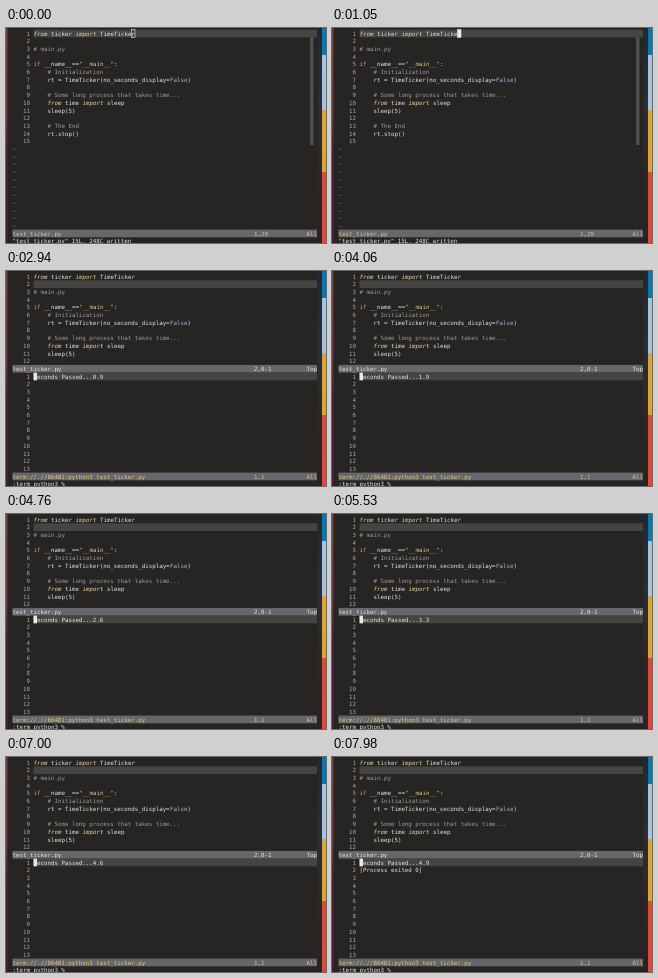
An HTML page that plays this animation: 320x215 px, repeating every 8.19 s.

```html
<!DOCTYPE html>
<html lang="en">
<head>
<meta charset="utf-8">
<title>Ticker in a split terminal</title>
<style>
  html, body { margin: 0; width: 100%; height: 100%; overflow: hidden; background: #272524; }
  svg { display: block; width: 100vw; height: 100vh; }
  text {
    font: 5.814px "DejaVu Sans Mono", "Noto Sans Mono", monospace;
    white-space: pre;
    text-rendering: geometricPrecision;
  }
</style>
</head>
<body>
<svg id="stage" viewBox="0 0 320 215">
  <defs>
    <linearGradient id="left" x2="0" y2="1">
      <stop offset="0" stop-color="#6e4440"/>
      <stop offset=".4" stop-color="#663a3c"/>
      <stop offset=".6" stop-color="#4c2038"/>
      <stop offset="1" stop-color="#4a1f38"/>
    </linearGradient>
    <linearGradient id="edge" x2="0" y2="1">
      <stop offset="0" stop-color="#1d2a36"/>
      <stop offset=".35" stop-color="#2b2e36"/>
      <stop offset=".6" stop-color="#30291f"/>
      <stop offset="1" stop-color="#2e2020"/>
    </linearGradient>
  </defs>
  <rect width="320" height="215" fill="#272524"/>
  <rect width="1.5" height="215" fill="url(#left)"/>
  <rect x="311.5" width="4.5" height="215" fill="url(#edge)"/>
</svg>
<script>
const NS = "http://www.w3.org/2000/svg";
const LOOP = 8190, STEP = 70;
const CW = 3.5, RH = 7.69, X0 = 6.5, Y0 = 1.65, COLS = 87;
const C = {
  fg: "#e6e4de", key: "#ead9a4", cond: "#e08a88", str: "#d6c47c", num: "#aeaed8",
  note: "#9c9a96", no: "#aaa8a4", now: "#e0a070", tilde: "#827e7c", gold: "#e2c680",
  bar: "#66676c", line: "#444443", cursor: "#e8e8e6"
};
// Wallpaper beside the window: [top, colour]
const STRIPES = [[0, "#0878b0"], [27, "#a9c3dd"], [82, "#dfa235"], [144, "#dd4a3c"]];
const stage = document.getElementById("stage");

function add(parent, tag, attrs) {
  const el = document.createElementNS(NS, tag);
  for (const k in attrs) el.setAttribute(k, attrs[k]);
  return parent.appendChild(el);
}
function box(parent, col, row, cols, fill) {
  return add(parent, "rect", {
    x: X0 + col * CW, y: Y0 + row * RH, width: cols * CW, height: RH, fill
  });
}
function put(parent, col, row, str, fill = C.fg, italic = false) {
  const el = add(parent, "text", { x: X0 + col * CW, y: Y0 + row * RH + 6, fill });
  if (italic) el.style.fontStyle = "italic";
  el.textContent = str;
  return el;
}

STRIPES.forEach(([y, fill]) => add(stage, "rect", { x: 316, y, width: 4, height: 215 - y, fill }));

// Each line is a list of [text, style] parts.
const CODE = [
  [["from ", "key"], ["ticker "], ["import ", "key"], ["TimeTicker"]],
  [],
  [["# main.py", "note"]],
  [],
  [["if ", "cond"], ["__name__=="], ['"__main__"', "str"], [":"]],
  [["    # Initialization", "note"]],
  [["    rt = TimeTicker(no_seconds_display="], ["False", "num"], [")"]],
  [],
  [["    # Some long process that takes time...", "note"]],
  [["    from ", "key"], ["time "], ["import ", "key"], ["sleep"]],
  [["    sleep(5)"]],
  [],
  [["    # The End", "note"]],
  [["    rt.stop()"]],
  []
];

function number(parent, n, row, active) {
  put(parent, 2, row, String(n).padStart(3), active ? C.now : C.no);
}
function cursorLine(parent, row) {
  box(parent, 6, row, COLS - 6, C.line);
}
function code(parent, count, active) {
  cursorLine(parent, active - 1);
  CODE.slice(0, count).forEach((parts, row) => {
    number(parent, row + 1, row, row + 1 === active);
    let col = 6;
    for (const [str, style = "fg"] of parts) {
      put(parent, col, row, str, C[style], style === "key");
      col += str.length;
    }
  });
}
function status(parent, row, name, pos, where, fill) {
  box(parent, 0, row, COLS, C.bar);
  put(parent, 0, row, name, fill);
  put(parent, 84, row, where, fill);
  return put(parent, 69, row, pos, fill);
}

// Editor alone
const editor = add(stage, "g", {});
code(editor, 15, 1);
for (let row = 15; row < 26; row++) put(editor, 0, row, "~", C.tilde);
add(editor, "rect", { x: 304, y: 9.3, width: 3.5, height: 107.7, fill: "#504f4e" });
status(editor, 26, "test_ticker.py", "1,29", "All", C.gold);
put(editor, 0, 27, '"test_ticker.py" 15L, 248C written');
const block = box(editor, 34, 0, 1, C.cursor);
block.setAttribute("stroke", C.cursor);
block.setAttribute("stroke-width", 0.6);

// Editor above, terminal below
const split = add(stage, "g", {});
code(split, 12, 2);
status(split, 12, "test_ticker.py", "2,0-1", "Top", C.fg);
cursorLine(split, 13);
for (let n = 1; n <= 13; n++) number(split, n, 12 + n, n === 1);
const count = put(split, 7, 13, "");
const done = put(split, 6, 14, "[Process exited 0]");
box(split, 6, 13, 1, C.cursor);
const pos = status(split, 26, "term://.//86481:python3 test_ticker.py", "1,0-1", "All", C.gold);
put(split, 0, 27, ":term python3 %");

const FOCUS = 490, START = 2030, EXIT = 7350, RATE = 1070;
function draw(now) {
  const t = Math.floor((now % LOOP) / STEP) * STEP;
  const running = t >= START;
  editor.style.display = running ? "none" : "";
  split.style.display = running ? "" : "none";
  block.setAttribute("fill", t < FOCUS ? "none" : C.cursor);
  const secs = Math.min(4.9, Math.round((t - START) / RATE * 10) / 10);
  const shown = secs > 0;
  count.textContent = shown ? "econds Passed..." + secs.toFixed(1) : "";
  pos.textContent = shown ? "1,1" : "1,0-1";
  done.style.display = t >= EXIT ? "" : "none";
}
const t0 = performance.now();
function tick() {
  draw(performance.now() - t0);
  requestAnimationFrame(tick);
}
tick();
</script>
</body>
</html>
```
